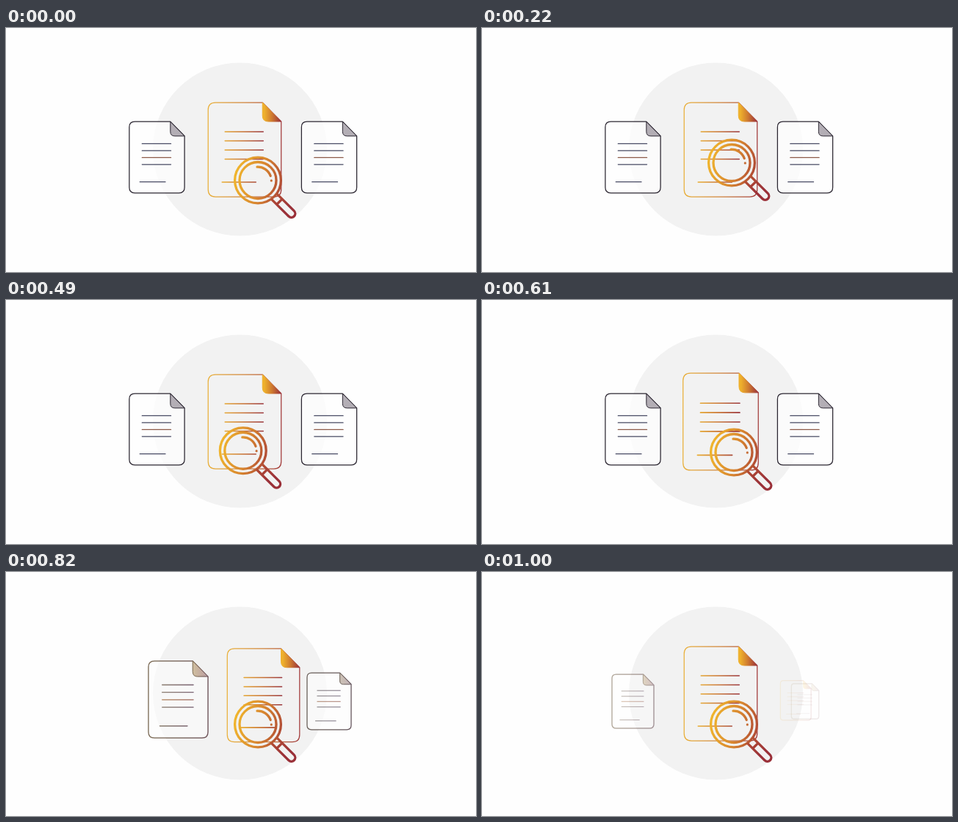
An HTML page for the animation above (1030 ms loop, 640 by 334 pixels).

```html
<!DOCTYPE html>
<html lang="en">
<head>
<meta charset="utf-8">
<title>Document search</title>
<style>
  html, body { margin: 0; width: 100%; height: 100%; overflow: hidden; background: #fefefe; }
  #stage { display: block; width: 100vw; height: 100vh; }
  .edge, .lines { fill: none; stroke-linejoin: round; }
  .edge { stroke-width: 1.25; }
  .edge, .fold { vector-effect: non-scaling-stroke; }
  .lines { stroke-width: 1.6; stroke-linecap: round; }
  .dark .edge { stroke: #2b2631; }
  .dark .lines { stroke: #474a63; }
  .dark .lines.warm { stroke: #8d5b49; }
  .dark .fold { fill: #b3aeb5; stroke: #2b2631; }
  .warm-set .edge { stroke: url(#pageTone); }
  .warm-set .lines { stroke: url(#lineTone); }
  .warm-set .fold { fill: url(#foldTone); stroke: url(#foldTone); }
  #lens { fill: none; stroke: url(#lensTone); stroke-width: 3.3; stroke-linecap: round; stroke-linejoin: round; }
</style>
</head>
<body>
<svg id="stage" viewBox="0 0 640 334">
  <defs>
    <linearGradient id="pageTone" gradientUnits="userSpaceOnUse" x1="0" y1="0" x2="99.5" y2="0">
      <stop offset="0" stop-color="#e9b03a"/><stop offset=".5" stop-color="#cf8136"/><stop offset="1" stop-color="#a23a3a"/>
    </linearGradient>
    <linearGradient id="lineTone" gradientUnits="userSpaceOnUse" x1="19" y1="0" x2="76" y2="0">
      <stop offset="0" stop-color="#e9ad30"/><stop offset=".5" stop-color="#c97333"/><stop offset="1" stop-color="#98323a"/>
    </linearGradient>
    <linearGradient id="foldTone">
      <stop offset=".1" stop-color="#eeb02c"/><stop offset=".5" stop-color="#cf7a30"/><stop offset="1" stop-color="#98303a"/>
    </linearGradient>
    <linearGradient id="lensTone" gradientUnits="userSpaceOnUse" x1="-33" y1="0" x2="51" y2="20">
      <stop offset="0" stop-color="#f0b52d"/><stop offset=".42" stop-color="#d8862f"/><stop offset=".78" stop-color="#ae4735"/><stop offset="1" stop-color="#9a3038"/>
    </linearGradient>
    <path id="sheet" d="M74 0H10Q0 0 0 10V119Q0 129 10 129H89.5Q99.5 129 99.5 119V26Z"/>
    <g id="marks">
      <use href="#sheet" class="edge"/>
    </g>
  </defs>
  <circle cx="318.5" cy="166" r="118.5" fill="#f2f2f2"/>
  <g id="docs"></g>
  <g id="lens">
    <circle r="31.4"/>
    <circle r="25"/>
    <path d="M-1 -18.4A18.4 18.4 0 0 1 17.2 -6"/>
    <circle cx="18.3" cy=".4" r="1.6" style="fill:url(#lensTone);stroke:none"/>
    <path transform="rotate(45)" d="M32 -5.2H64.5A5.2 5.2 0 0 1 64.5 5.2H32M41.5 -5.2V5.2"/>
  </g>
</svg>
<script>
const LOOP = 1030, HOLD = 70, STEP = 30;
const SIDE = 0.756, LEFT = 205.5, MIDDLE = 325, RIGHT = 440, SIDE_Y = 177, MIDDLE_Y = 166.5;
const docLayer = document.getElementById('docs');
const lens = document.getElementById('lens');

const sheet = 'M74 0H10Q0 0 0 10V119Q0 129 10 129H89.5Q99.5 129 99.5 119V26Z';
const skin = name => `
  <g class="${name}">
    <path class="edge" d="${sheet}"/>
    <path class="fold" d="M74 0V18Q74 26 82 26H99.5Z"/>
    <path class="lines" d="M23 40H75M23 52.5H75M23 77.5H75M19 109H65"/>
    <path class="lines warm" d="M23 65H75"/>
  </g>`;

function makeDoc() {
  const g = document.createElementNS('http://www.w3.org/2000/svg', 'g');
  g.innerHTML = `<path d="${sheet}" fill="#fefefe"/>` + skin('dark') + skin('warm-set');
  docLayer.append(g);
  const [paper, dark, warm] = g.children;
  // warmth blends from the dark side look (0) to the gradient look (1)
  return (x, y, scale, warmth, opacity = 1) => {
    g.setAttribute('transform', `translate(${x} ${y}) scale(${scale}) translate(-49.75 -64.5)`);
    g.setAttribute('opacity', opacity);
    paper.setAttribute('opacity', 0.8 * (1 - warmth));
    dark.setAttribute('opacity', 1 - warmth);
    warm.setAttribute('opacity', warmth);
  };
}

const [newcomer, rightDoc, leftDoc, mainDoc] = Array.from({ length: 4 }, makeDoc);

const mix = (a, b, p) => a + (b - a) * p;
const smooth = p => p * p * (3 - 2 * p);
const span = (t, from, to) => Math.min(1, Math.max(0, (t - from) / (to - from)));

// Piecewise linear value through [time, value] keys
function track(t, ...keys) {
  let value = keys[0][1];
  for (let i = 1; i < keys.length; i++) {
    const [t0] = keys[i - 1], [t1, v1] = keys[i];
    value = mix(value, v1, span(t, t0, t1));
  }
  return value;
}

function render(ms) {
  const t = ms < HOLD ? 0 : HOLD + STEP * Math.floor((ms - HOLD) / STEP);

  const lensX = track(t, [203, 343], [318, 322.8], [508, 322.8], [580, 343]);
  const lensY = track(t, [70, 208.5], [203, 184.5], [318, 184.5], [508, 208.5]);
  lens.setAttribute('transform', `translate(${lensX} ${lensY})`);

  const enter = smooth(span(t, 735, 1000));
  leftDoc(mix(LEFT, MIDDLE, enter), mix(SIDE_Y, MIDDLE_Y, enter), mix(SIDE, 1, enter), enter);

  const leave = span(t, 760, 1030);
  mainDoc(mix(MIDDLE, RIGHT, leave), mix(MIDDLE_Y, SIDE_Y, leave),
    track(t, [580, 1], [760, 1.18], [880, 0.8], [1000, 0.42]), 1,
    track(t, [880, 1], [1000, 0.12]));

  rightDoc(RIGHT, SIDE_Y, track(t, [695, SIDE], [730, 0.713], [880, 0.53], [1000, 0.375]), 0.4 * span(t, 730, 1000),
    track(t, [730, 1], [880, 0.8], [1000, 0.14]));

  const grow = span(t, 880, 1000);
  newcomer(LEFT, SIDE_Y, mix(0.42, 0.573, grow), 0.25, 0.6 * grow);
}

function tick() {
  render(performance.now() % LOOP);
  requestAnimationFrame(tick);
}
tick();
</script>
</body>
</html>
```
